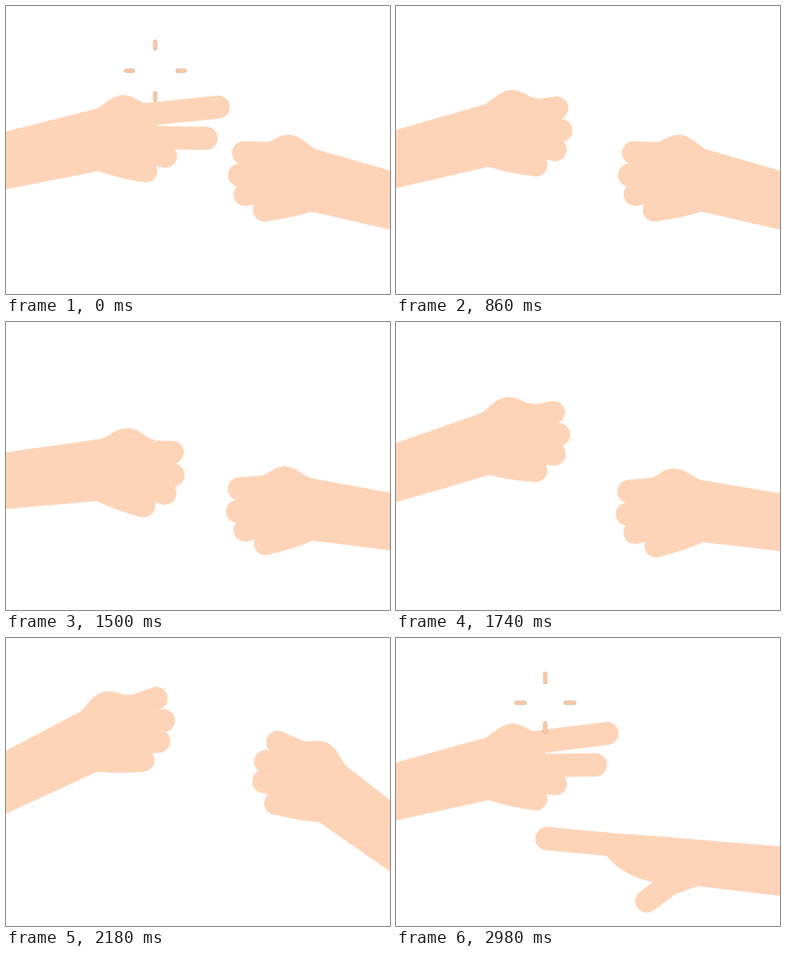
Animation of 480 by 360 pixels, one loop 3000 ms. Source, as an HTML page:

```html
<!DOCTYPE html>
<html lang="en">
<head>
<meta charset="utf-8">
<title>Rock paper scissors</title>
<style>
html, body { margin: 0; width: 100%; height: 100%; overflow: hidden; background: #fff; }
svg { display: block; width: 480px; height: 360px; }

.hand {
  --skin: #fdd4b7;
  --palm: path("M-80 178L111 123C122 117 130 105 145 105C158 105 166 115 176 115L186 128L186 165C186 180 186 205 175 213C155 211 135 207 116 201L-80 246Z");
  --flat: path("M-80 180L120 168C135 167 150 166 168 165C185 164 205 163 226 162L230 162L234 191C220 208 200 218 176 222C165 250 145 234 120 226L-80 245.6Z");
  transform-origin: -49px 194px;
  fill: var(--skin);
  stroke: var(--skin);
  stroke-width: 29px;
  stroke-linecap: round;
}
.hand, .hand *, .drop, .burst path, .burst { animation: 3s ease-in-out infinite; }
.palm { d: var(--palm); stroke: none; }

/* Left hand: shake, then scissors. */
.hand.left { animation-name: shake-left; }
@keyframes shake-left {
  0% { transform: rotate(1.9deg); }
  8.7%, 18% { transform: rotate(1deg); }
  28.7% { transform: rotate(0deg); }
  35.3% { transform: rotate(-8.5deg); }
  44%, 50.5% { transform: rotate(8deg); }
  68.7% { transform: rotate(-24deg); }
  77% { transform: rotate(2deg); }
  83%, 100% { transform: rotate(.6deg); }
}
.hand .finger { animation-name: stretch; }
@keyframes stretch {
  0%, 18%, 76.3%, 100% { transform: translate(var(--x), var(--y)); }
  25.3%, 71.7% { transform: none; }
}

/* Right hand: shake, then paper. */
.hand.right { animation-name: shake-right; }
@keyframes shake-right {
  0%, 28.7% { transform: rotate(0deg); }
  37% { transform: rotate(-10deg); }
  55% { transform: rotate(8.6deg); }
  71.3% { transform: rotate(-23deg); }
  80.3% { transform: rotate(1.6deg); }
  83.3% { transform: rotate(0deg); animation-timing-function: ease-out; }
  100% { transform: rotate(-1.2deg); }
}
.drop { animation-name: drop; }
@keyframes drop {
  0%, 58% { transform: none; }
  72%, 83.3% { transform: translateY(35px); animation-timing-function: ease-out; }
  100% { transform: translateY(31.7px); }
}
.hand .morph { d: var(--from); animation-name: morph; }
@keyframes morph {
  0%, 73% { d: var(--from); }
  77.3%, 100% { d: var(--to); }
}
.hand .tuck { animation-name: tuck; }
@keyframes tuck {
  0%, 73% { transform: none; }
  77.3%, 100% { transform: translate(-30px, 28px); }
}
.right .palm { --from: var(--palm); --to: var(--flat); }
.index { --from: path("M172 128.5L201 127.5"); --to: path("M228 176.5L310 170.5"); }
.thumb { --from: path("M160 190L175 199"); --to: path("M155 224L183.5 246"); }

/* Sparks shoot outwards, then shrink away at the rim. */
.burst, .burst path { animation-delay: var(--delay); }
.burst { animation-name: flash; stroke-linecap: round; }
.burst path { animation-name: shoot; animation-timing-function: linear; }
@keyframes flash {
  0%, 12% { opacity: 1; }
  12.01%, 100% { opacity: 0; }
}
@keyframes shoot {
  0% { d: path("M3 0H3"); }
  4.4% { d: path("M14 0H36"); }
  6.7% { d: path("M24.5 0H36"); }
  7.7% { d: path("M28 0H36.5"); }
  12%, 100% { d: path("M36.5 0H36.5"); }
}
</style>
</head>
<body>
<svg viewBox="0 0 480 360">
  <g class="hand left">
    <path class="palm"/>
    <path class="finger" style="--x:62px; --y:-11.5px" d="M116 139L201 127.5"/>
    <path class="finger" style="--x:43px; --y:0px" d="M130 157L206 155.5"/>
    <path d="M190 178L199 179.5M160 190L175 198.5"/>
  </g>
  <g transform="translate(498 56) scale(-1 1)">
    <g class="drop">
      <g class="hand right">
        <path class="palm morph"/>
        <path class="index morph"/>
        <path class="tuck" d="M130 157L206 155.5M190 178L199 179.5"/>
        <path class="thumb morph"/>
      </g>
    </g>
  </g>
</svg>
<script>
const svg = document.querySelector('svg');

function addBurst(x, y, delay, width, fill, edge) {
  const ray = turn => `<g transform="rotate(${turn})">
    <path stroke="${edge}" stroke-width="${width}"/>
    <path stroke="${fill}" stroke-width="${width - 1.4}"/></g>`;
  svg.insertAdjacentHTML('beforeend',
    `<g transform="translate(${x} ${y})"><g class="burst" style="--delay:${delay}ms">
    ${[0, 90, 180, 270].map(ray).join('')}</g></g>`);
}

addBurst(186.5, 81, -230, 5, '#fcc9a8', '#d3a68b');
addBurst(329, 195.8, -700, 6, '#74cfb0', '#5fb397');
</script>
</body>
</html>
```
